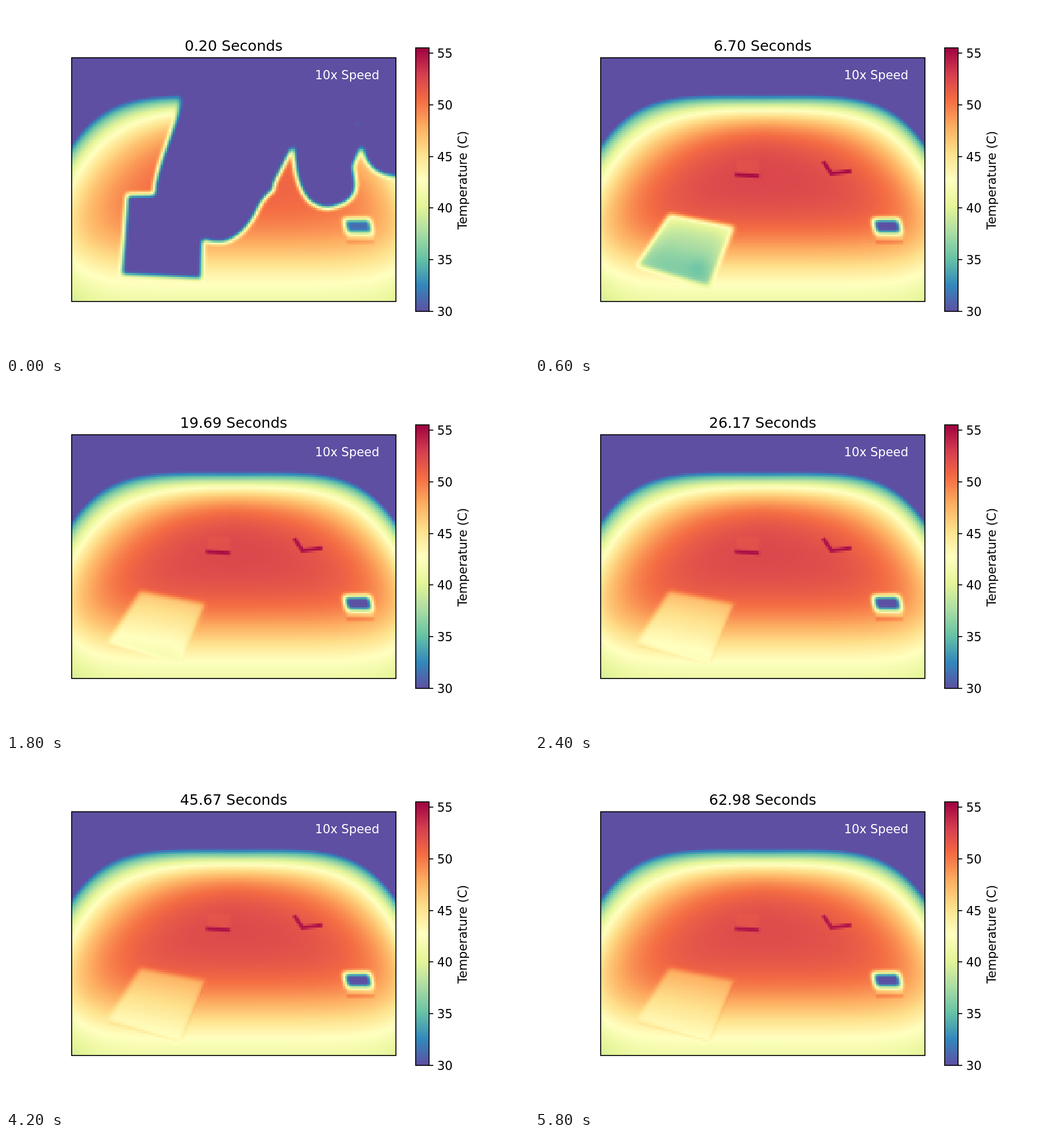
Recreate the animation shown at these times as an HTML page with a canvas. Size 900 by 600 pixels, loop 6 s.

```html
<!DOCTYPE html>
<html lang="en">
<head>
<meta charset="utf-8">
<title>Thermal view</title>
<style>
html, body { margin: 0; width: 100%; height: 100%; overflow: hidden; background: #fff; }
canvas { display: block; }
</style>
</head>
<body>
<canvas id="stage" width="900" height="600"></canvas>
<script>
const ctx = document.getElementById('stage').getContext('2d');
const COLS = 160, ROWS = 120, LEFT = 113, TOP = 89, W = 558, H = 419;
const LOW = 30, HIGH = 55.5, STEP = 200, STEPS = 30;

const palette = ['5e4fa2', '3288bd', '66c2a5', 'abdda4', 'e6f598', 'ffffbf',
  'fee08b', 'fdae61', 'f46d43', 'd53e4f', '9e0142'];
const rgb = palette.map(h => [0, 2, 4].map(k => parseInt(h.substr(k, 2), 16)));

const clamp = (v, a = 0, b = 1) => Math.min(b, Math.max(a, v));
const mix = (a, b, k) => a + (b - a) * k;

function newGrid() {
  const canvas = document.createElement('canvas');
  canvas.width = COLS;
  canvas.height = ROWS;
  return canvas.getContext('2d');
}

// Coverage of a path per sensor cell, blurred by some cells; stroked if a width is given
function mask(path, blur, width) {
  const g = newGrid(), shape = new Path2D(path);
  if (blur) g.filter = `blur(${blur}px)`;
  g.setTransform(COLS / W, 0, 0, ROWS / H, -LEFT * COLS / W, -TOP * ROWS / H);
  g.lineWidth = width;
  if (width) g.stroke(shape);
  else g.fill(shape);
  const { data } = g.getImageData(0, 0, COLS, ROWS);
  return n => data[n * 4 + 3] / 255;
}

const platePath = 'M231 358L343 380L299 482L176 446Z';
const plate = mask(platePath, .9);
const plateCore = mask(platePath, 4);
const plateRim = mask('M343 383L301 482M176 451L298 483', .4, 5);
const hatch = mask('M581 367H626L631 391H587Z', .9);
const hatchSide = mask('M586 391H633V402H587Z', 0);
const hatchFoot = mask('M586 402H634V409H587Z', 0);
const patch = mask('M347 265H386V288H347Z', 0);
const marks = mask('M344 290L386 292M496 267L510 288L545 284', .4, 7);
const speck = mask('M601 199h8v8h-8z', 0);
const figure = mask(`M301 60V157C297 200 255 275 255 324L208 325L199 462L336 469L339 402
  C365 412 400 412 430 358Q443 328 460 318L463 303L494 242Q497 347 552 348
  C590 345 606 325 602 300L598 275L612 241Q620 292 672 294H700V60Z`, .9);

// Heat falls off towards the curved far edge, the sides and the near edge
function floorTemp(x, y) {
  const u = (x - 392) / 280, a = Math.abs(u);
  const d = y - 152 - 88 * a ** 4.7;
  if (d < 0) return LOW;
  const reach = 34 + (u < 0 ? 54 : 36) * a ** 2.2;
  const far = 23 * Math.exp(-((d / reach) ** (1.1 - .3 * a)));
  const near = 13.5 / (1 + Math.exp((437 - y) / 37));
  return 53 - far - near;
}

// The plate starts cold and warms quickly, then slowly
function plateTemp(x, y, n, i) {
  const v = clamp((y - 358 - (x - 232) * .2) / 105);
  const lag = 17 * Math.exp(-.5 * (i - 1)) + 2.6 * Math.exp(-.08 * (i - 1));
  const corner = Math.exp(-(((x - 283) / 18) ** 2) - ((y - 450) / 18) ** 2);
  return 48.2 - 5 * v - lag * (.58 + .4 * plateCore(n) + .08 * corner);
}

const still = Array.from({ length: COLS * ROWS }, (_, n) => {
  const x = LEFT + (n % COLS + .5) * W / COLS;
  const y = TOP + (Math.floor(n / COLS) + .5) * H / ROWS;
  const t = floorTemp(x, y) - .35 * patch(n) + 1.3 * (hatchFoot(n) - hatchSide(n));
  return { x, y, t: mix(t, 55, marks(n)) };
});

function tempAt(n, i) {
  let { x, y, t } = still[n];
  const excess = Math.max(0, t - 42);
  if (i === 0) {
    t = mix(t - .14 * excess, 31.3, hatch(n));
    return mix(t, 29.5, figure(n)) + speck(n);
  }
  t -= .03 * excess * i / STEPS;
  t = mix(t, plateTemp(x, y, n, i), plate(n));
  t += .8 * clamp((i - 5) / 8) * plateRim(n);
  return mix(t, 29.5, hatch(n));
}

const heat = newGrid();
const pixels = heat.createImageData(COLS, ROWS);

function drawHeat(i) {
  for (let n = 0; n < COLS * ROWS; n++) {
    const p = clamp((tempAt(n, i) - LOW) / (HIGH - LOW)) * 10;
    const k = Math.min(9, Math.floor(p));
    for (let j = 0; j < 3; j++)
      pixels.data[n * 4 + j] = Math.round(mix(rgb[k][j], rgb[k + 1][j], p - k));
    pixels.data[n * 4 + 3] = 255;
  }
  heat.putImageData(pixels, 0, 0);
  ctx.imageSmoothingEnabled = false;
  ctx.drawImage(heat.canvas, LEFT, TOP, W, H);
  ctx.strokeRect(LEFT, TOP, W, H);
}

function text(s, x, y, align = 'center', size = 20.83, color = '#000') {
  ctx.font = `${size}px "DejaVu Sans", sans-serif`;
  ctx.textAlign = align;
  ctx.fillStyle = color;
  ctx.fillText(s, x, y);
}

function drawBar() {
  const g = ctx.createLinearGradient(0, 525, 0, 72);
  palette.forEach((h, k) => g.addColorStop(k / 10, '#' + h));
  ctx.fillStyle = g;
  ctx.fillRect(705, 72, 23, 453);
  ctx.strokeRect(705, 72, 23, 453);
  for (let t = 30; t <= 55; t += 5) {
    const y = Math.round(525 - (t - 30) * 17.76);
    ctx.beginPath();
    ctx.moveTo(728, y);
    ctx.lineTo(735.3, y);
    ctx.stroke();
    text(t, 742, y + 8, 'left');
  }
  ctx.save();
  ctx.translate(792.5, 299.5);
  ctx.rotate(-Math.PI / 2);
  text('Temperature (C)', 0, 0);
  ctx.restore();
}

// Clock readings in seconds at a few steps, even in between
const clock = [[0, .2], [1, 2.38], [5, 11.02], [9, 19.69], [16, 34.82], [21, 45.67], [29, 62.98]];
function seconds(i) {
  const k = Math.max(1, clock.findIndex(c => c[0] >= i));
  const [a, b] = [clock[k - 1], clock[k]];
  return mix(a[1], b[1], (i - a[0]) / (b[0] - a[0])).toFixed(2);
}

function draw(i) {
  ctx.fillStyle = '#fff';
  ctx.fillRect(0, 0, 900, 600);
  ctx.strokeStyle = '#000';
  ctx.lineWidth = 1.67;
  drawHeat(i);
  drawBar();
  const title = s => text(s + ' Seconds', 391.8, 77, 'center', 25);
  title(seconds(i));
  if (i === 1) title(seconds(0)); // the first reading lingers for one step
  text('10x Speed', 587, 126, 'center', 20.83, '#fff');
}

let shown = -1;
function tick() {
  const i = Math.floor(performance.now() / STEP) % STEPS;
  if (i !== shown) draw(shown = i);
  requestAnimationFrame(tick);
}
tick();
</script>
</body>
</html>
```
